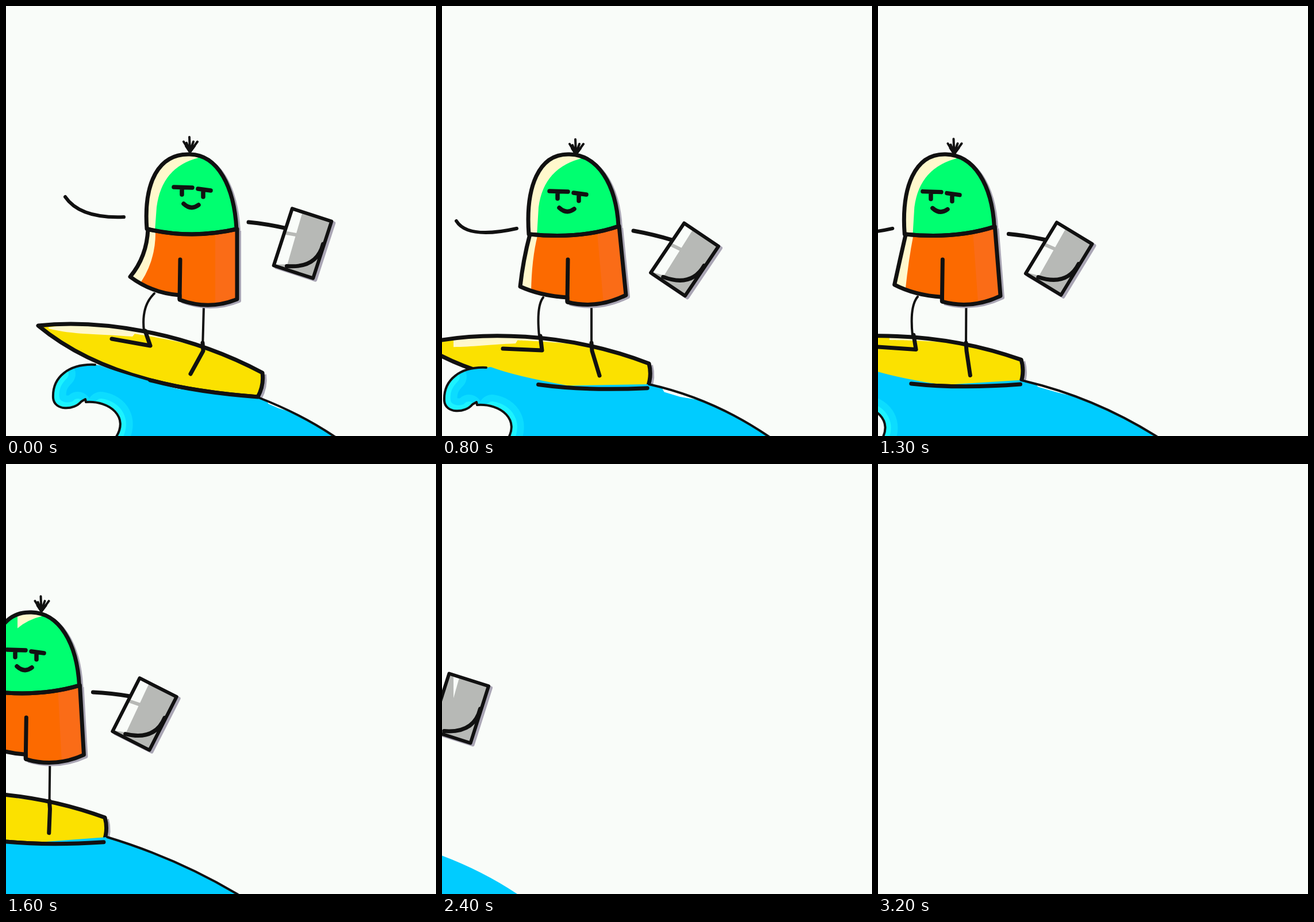
These frames come from a looping animation (748 by 748 pixels, 4 s). An HTML page:

```html
<!DOCTYPE html>
<html lang="en">
<head>
<meta charset="utf-8">
<title>Surfer</title>
<style>
  html, body { margin: 0; width: 100%; height: 100%; overflow: hidden; background: #f9fcf9; }
  svg { display: block; width: 100%; height: 100%; }
  path { fill: none; }
  .ink path, path.ink { stroke: #111; stroke-width: 7; stroke-linecap: round; stroke-linejoin: round; }
  .thin { stroke-width: 4 !important; }
  .mid { stroke-width: 6 !important; }
  .shade { stroke: #aaa6b5; stroke-width: 6; stroke-linejoin: round; }
  .cream { fill: #fff8cc; }
</style>
</head>
<body>
<svg viewBox="0 0 748 748">
  <defs>
    <clipPath id="lit"><rect x="20" y="0" width="728" height="748"/></clipPath>
    <clipPath id="inWave"><path id="waveClip"/></clipPath>
  </defs>

  <g transform="translate(4 3)"><path id="boardShade" class="shade"/></g>
  <path id="board" style="fill:#fbe100"/>
  <g clip-path="url(#lit)"><path id="boardLight" class="cream"/></g>
  <path id="boardLine" class="ink"/>

  <path id="wave" style="fill:#00ccff"/>
  <g clip-path="url(#inWave)" stroke-linecap="round">
    <path id="foamWide" stroke="#0cdcff" stroke-width="46"/>
    <path id="foamNarrow" stroke="#1cf3ff" stroke-width="22"/>
  </g>
  <g clip-path="url(#lit)"><path id="gap" style="fill:#fff"/></g>
  <path id="curlLine" class="ink thin"/>
  <path id="slopeLine" class="ink thin"/>
  <path id="keel" class="ink" stroke-dasharray="190 999"/>

  <g id="legs" class="ink">
    <path id="thinLegs" class="thin"/>
    <path id="feet"/>
  </g>
  <g id="bodyShade"><path id="headShade" class="shade"/><path id="pantsShade" class="shade"/></g>
  <g id="fills">
    <path id="head" style="fill:#00ff70"/>
    <path id="pants" style="fill:#fc6a00"/>
    <path id="pantsSide" style="fill:#fa6c17"/>
  </g>
  <g clip-path="url(#lit)"><g id="lights">
    <path id="headLight" class="cream"/><path id="pantsLight" class="cream"/>
  </g></g>
  <g id="lines" class="ink">
    <path id="headLine"/><path id="pantsLine"/><path id="slit"/>
    <path id="leftArm" class="mid"/>
    <path id="face" style="stroke-width:7.5"/>
    <path id="hair" d="M-11 -17L0 1L-1 -25M0 1L13 -17M-6 -15L0 0L6 -17" style="stroke-width:4"/>
    <path id="tuft" d="M-8 -9L0 3L9 -9Z" style="fill:#111;stroke-width:2"/>
  </g>
  <path id="rightArm" class="ink"/>

  <g transform="translate(4 3)"><path id="bookShade" class="shade"/></g>
  <path id="book" style="fill:#b7b9b6"/>
  <g clip-path="url(#lit)"><path id="bookLight" style="fill:#f9fcf9"/></g>
  <g id="bookLines">
    <path d="M-35 -8L-14 -11" stroke="#b7b9b6" stroke-width="6"/>
    <path id="bookLine" class="ink mid"/>
    <path class="ink" d="M-14 46Q37 34 34 -10"/>
  </g>
</svg>
<script>
const STEP = 100, LOOP = 4000, LAST = 32;
const times = [0, 4, 8, 11, 16, 24, 32];
const tracks = {
  bodyX: [323, 290, 229, 171, 49.5, -160, -370],
  lean: [0, .65, 1, .94, .58, 0, 0],
  faceX: [0, -16, -11, -14, -16.5, -15, 0],
  faceY: [0, .5, 7, 7, 8, 2, 0],
  hairX: [-3, 2, 4, 5, 12, 5, 0],
  armY: [376, 384, 391, 395, 397, 390, 385],
  bookX: [516, 487, 422, 361, 241, 31, -170],
  bookY: [413, 427, 441, 442, 435, 425, 420],
  bookTurn: [18, 25, 34, 33.7, 27, 17.6, 15],
  boardX: [446, 422, 360, 298, 172, -40, -250],
  boardY: [638, 634, 622, 617, 615, 625, 640],
  boardTurn: [0, -2.2, -7, -8.5, -8, -6, -4],
  curlX: [0, -19, -78, -139, -262, -480, -700],
  curlY: [0, 3, 5, 6, 6, 4, 0],
  crestX: [439, 417, 360, 295, 176, -32, -170],
  crestY: [681, 673, 658, 654, 649, 670, 684],
  endX: [570, 575, 567, 528, 402, 131, -12],
  bulge: [5, 9, 20, 24, 13, 10, 8],
  gap: [4, 0, 7, 7, 0, 0, 0]
};

const el = Object.fromEntries([...document.querySelectorAll('[id]')].map(e => [e.id, e]));
const draw = (id, d) => el[id].setAttribute('d', d);
const place = (ids, transform) => ids.forEach(id => el[id].setAttribute('transform', transform));

// Hermite curve with finite-difference slopes through unevenly spaced keys
function sample(values, n) {
  let i = 0;
  while (i < times.length - 2 && n >= times[i + 1]) i++;
  const slope = k => {
    const a = Math.max(0, k - 1), b = Math.min(times.length - 1, k + 1);
    return (values[b] - values[a]) / (times[b] - times[a]);
  };
  const span = times[i + 1] - times[i], u = (n - times[i]) / span;
  const ease = u * u * (3 - 2 * u);
  return values[i] * (1 - ease) + values[i + 1] * ease
    + span * u * (1 - u) * ((1 - u) * slope(i) - u * slope(i + 1));
}

function drawBoard(p) {
  const bottom = 'C-117 34 -277 12 -390 -82';
  const hull = `M-390 -82C-287 -93 -137 -73 0 0Q3 22 -8 42${bottom}Z`;
  ['board', 'boardLine'].forEach(id => draw(id, hull));
  draw('keel', `M-8 42${bottom}`);
  draw('boardShade', 'M0 0Q3 22 -8 42');
  draw('boardLight', 'M-372 -79C-300 -90 -200 -84 -110 -46C-190 -64 -215 -66 -222 -68L-226 -63C-290 -68 -330 -66 -372 -77Z');
  place(['board', 'boardLine', 'boardShade', 'boardLight', 'keel'],
    `translate(${p.boardX} ${p.boardY}) rotate(${p.boardTurn})`);
}

function drawWave(p, n) {
  const at = (x, y) => `${x + p.curlX} ${y + p.curlY} `;
  const bulb = `C${at(110, 622)}${at(80, 645)}${at(82, 682)}C${at(84, 704)}${at(118, 704)}${at(131, 688)}`;
  const hollow = `L${at(138, 684)}L${at(139, 689)}C${at(180, 686)}${at(216, 715)}${at(190, 752)}`;
  const midX = (p.crestX + p.endX) / 2 + 8, midY = (p.crestY + 748) / 2 - p.bulge;
  const edgeY = y => y + p.curlY * .6;
  const shape = `M${at(155, 624)}${bulb}${hollow}L${p.curlX + 190} 770L${p.endX + 20} 770V760L${p.endX} 748`
    + `Q${midX} ${midY} ${p.crestX} ${p.crestY}L${p.curlX + 298} ${666 + p.boardTurn * .8}`
    + `Q${p.curlX + 205} ${edgeY(641)} ${p.curlX + 163} ${edgeY(625)}Z`;
  draw('wave', shape);
  draw('waveClip', shape);
  const foam = `M${at(98, 640)}C${at(86, 652)}${at(80, 664)}${at(82, 682)}C${at(84, 704)}${at(118, 704)}${at(125, 694)}`
    + `M${at(165, 694)}C${at(192, 698)}${at(208, 722)}${at(190, 752)}`;
  draw('foamWide', foam);
  draw('foamNarrow', foam);
  draw('curlLine', `M${at(155, 624)}${bulb}${hollow}`);
  draw('slopeLine', n < 20 ? `M${p.crestX} ${p.crestY}Q${midX} ${midY} ${p.endX} 748l20 12` : '');

  const on = (u, drop = 0) => {
    const v = 1 - u;
    return `${v * v * p.crestX + 2 * u * v * midX + u * u * p.endX} ${v * v * p.crestY + 2 * u * v * midY + u * u * 748 + drop} `;
  };
  draw('gap', p.gap > .5 ? `M${on(.1)}L${on(.25)}L${on(.42)}L${on(.25, p.gap)}L${on(.12, p.gap)}Z` : '');
}

function drawBody(p) {
  const mix = (a, b, k = p.lean) => a + (b - a) * k;
  const sway = Math.min(1, p.lean * 1.4);
  const left = mix(388, 397, sway), right = mix(388, 383);
  const apex = mix(-3, -7), apexY = 258;
  const slitX = mix(-20, -10), hem = mix(503, 507);
  const cuffL = [mix(-107, -93), mix(471, 488)], cuffR = [mix(79, 91), mix(510, 503)];

  const dome = `M-78 ${left}C-84 ${left - 82} ${apex - 54} ${apexY - 2} ${apex} ${apexY}`;
  const cheek = `C${apex + 49} ${apexY + 1} 74 ${right - 73} 78 ${right}`;
  const waist = `Q${mix(0, 12)} 406 -78 ${left}Z`;
  draw('head', dome + cheek + waist);
  draw('headLine', dome + cheek + waist);
  draw('headShade', `M${apex} ${apexY}${cheek}`);
  draw('headLight', `${dome}L${mix(12, 18)} 264Q-52 280 -61 350L-64 ${left + 3}Z`);

  const leg = `Q${mix(-78, -88)} ${mix(436, 442)} ${cuffL[0]} ${cuffL[1]}`;
  const hems = `Q${slitX - 48} ${hem - 3} ${slitX - 1} ${hem}L${slitX - 1} ${hem + 8}Q${slitX + 50} ${mix(530, 528)} ${cuffR[0]} ${cuffR[1]}`;
  const pants = `M-76 ${left}${leg}${hems}L79 ${right}Q${mix(0, 12)} 406 -76 ${left}Z`;
  draw('pants', pants);
  draw('pantsLine', pants);
  draw('pantsShade', `M79 ${right}L${cuffR[0]} ${cuffR[1]}Q${slitX + 50} ${mix(530, 528)} ${slitX - 1} ${hem + 8}`);
  draw('pantsSide', `M41 395L79 ${right}L${cuffR[0]} ${cuffR[1]}L${mix(41, 52)} 518Z`);
  draw('pantsLight', `M-76 ${left}${leg}L${cuffL[0] + 19} ${cuffL[1] + 9}Q${mix(-62, -73)} 440 -63 ${left + 3}Z`);
  draw('slit', `M${slitX} 441L${slitX - 1} ${hem + 6}`);

  draw('leftArm', `M${mix(-220, -204, sway)} ${mix(332, 374, sway)}Q${mix(-194, -184, sway)} ${mix(370, 406, sway)} ${mix(-118, -99, sway)} ${mix(367, 387, sway)}`);
  draw('face', 'M-31 315L1 316M-17 317V328M11 318L33 321M20 320V332M-14 344Q-1 356 12 346');
  place(['face'], `translate(${p.faceX} ${p.faceY})`);
  place(['hair', 'tuft'], `translate(${p.hairX} ${mix(253, 257)})`);

  const knee = [mix(-83, -60), mix(565, 574)], shin = mix(19, 31);
  draw('thinLegs', `M${mix(-65, -53)} ${mix(500, 507)}Q${knee[0] - 5} 522 ${knee[0]} ${knee[1]}M${mix(21, 31)} 524L${shin} 596`);
  draw('feet', `M${knee[0] + 2} ${knee[1]}L${mix(-72, -55)} ${mix(591, 599)}L${mix(-139, -123)} ${mix(579, 596)}`
    + `M${shin} 586L${shin + 1} 600L${mix(-2, 45)} ${mix(640, 643)}`);

  place(['legs', 'fills', 'lights', 'lines'], `translate(${p.bodyX} 0)`);
  place(['bodyShade'], `translate(${p.bodyX + 4} 3)`);
  return p.bodyX + mix(99, 104);
}

function drawBook(p, shoulderX) {
  const turn = p.bookTurn * Math.PI / 180, cos = Math.cos(turn), sin = Math.sin(turn);
  const handX = p.bookX - 37 * cos + 16 * sin, handY = p.bookY - 37 * sin - 16 * cos;
  draw('rightArm', `M${shoulderX} ${p.armY}Q${(shoulderX + handX) / 2} ${(p.armY + handY) / 2 - 2} ${handX} ${handY}`);
  ['book', 'bookShade', 'bookLine'].forEach(id => draw(id, 'M-36 -52H36V52H-36Z'));
  draw('bookLight', 'M-33 -49H-17L-14 43L-33 49Z');
  place(['book', 'bookShade', 'bookLight', 'bookLines'],
    `translate(${p.bookX} ${p.bookY}) rotate(${p.bookTurn})`);
}

function render(ms) {
  const n = Math.min(LAST, Math.floor(ms % LOOP / STEP));
  const pose = {};
  for (const name in tracks) pose[name] = sample(tracks[name], n);
  drawBoard(pose);
  drawWave(pose, n);
  drawBook(pose, drawBody(pose));
}

const start = performance.now();
function tick() {
  render(performance.now() - start);
  requestAnimationFrame(tick);
}
tick();
</script>
</body>
</html>
```
